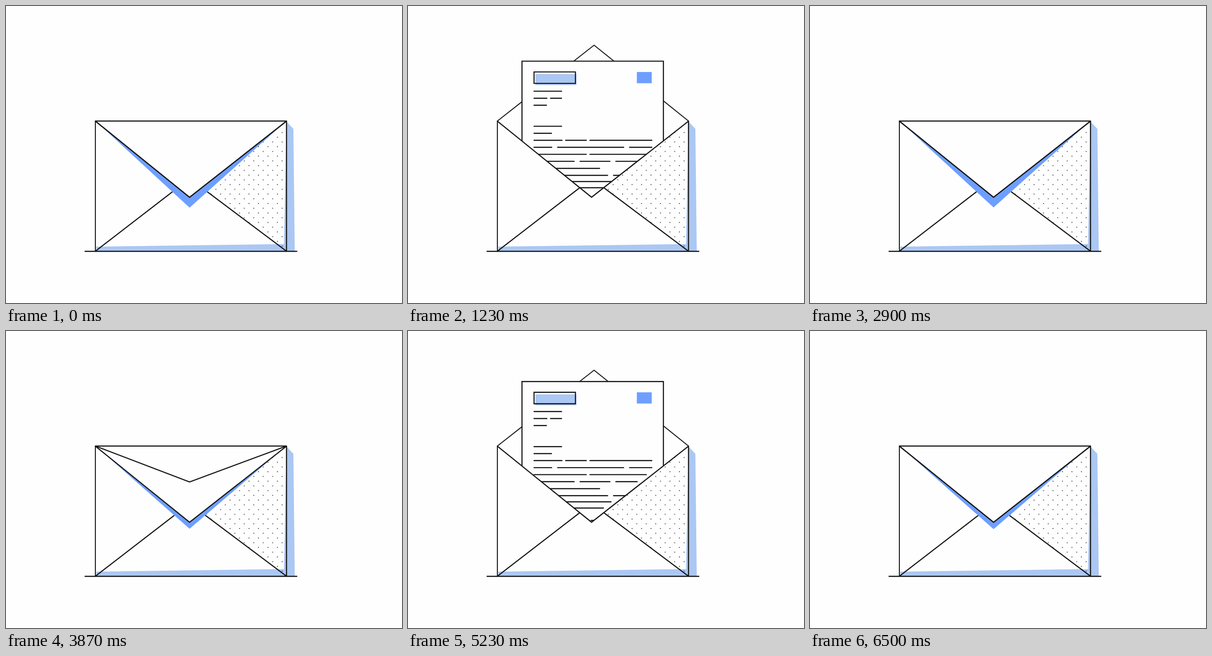
Animation of 864 by 648 pixels, one loop 6.53 s. Source, as an HTML page:

```html
<!DOCTYPE html>
<html lang="en">
<head>
<meta charset="utf-8">
<title>Envelope</title>
<style>
  html, body { margin: 0; width: 100%; height: 100%; overflow: hidden; background: #fefefe; }
  svg { display: block; width: 864px; height: 648px; }
  .line { fill: none; stroke: #151515; stroke-width: 2.4; stroke-linecap: round; stroke-linejoin: round; }
  .sheet { fill: #fefefe; stroke: #151515; stroke-width: 2.4; }
  .thin { stroke-width: 2.1; }
  .square { stroke-linejoin: miter; }
  .pale { fill: #abc7f3; }
  .blue { fill: #6e9fff; }
  .white { fill: #fefefe; }
</style>
</head>
<body>
<svg viewBox="0 0 864 648">
  <defs>
    <pattern id="dots" x="592.17" y="265.67" width="20.66" height="20.66" patternUnits="userSpaceOnUse">
      <circle cx="10.33" cy="10.33" r="1.1" fill="#222"/>
      <path d="M0 0h.01M20.66 0h.01M0 20.66h.01M20.66 20.66h.01" stroke="#222" stroke-width="2.2" stroke-linecap="round"/>
    </pattern>
    <clipPath id="pocket"><path d="M0 0H864V530H0Z"/></clipPath>
  </defs>

  <path id="backFlap" class="line thin"/>

  <g clip-path="url(#pocket)">
    <g id="letter">
      <path class="sheet" d="M248.7 .5H557.2V330H248.7Z"/>
      <path class="pale" d="M278 28.5H367.5V52.5H278Z"/>
      <path class="line square" d="M275 24H365.3V49H275Z"/>
      <path class="blue" d="M499.3 24H531.8V48.5H499.3Z"/>
      <path id="text" class="line"/>
    </g>
  </g>

  <path class="white" d="M195 251.3L400.5 417.3L612 251.3V535H195Z"/>
  <path class="pale" d="M612 252L627 268L630 535H197V525L606.5 519.5Z"/>
  <path fill="url(#dots)" d="M612 251.5L428 396L612 537Z"/>
  <path class="line" d="M195 535L374 397M612 535L428 397"/>
  <path id="shade" class="blue"/>
  <path class="line" d="M195 251.3L400.5 417.3L612 251.3"/>
  <path id="frontFlap" class="line" style="fill:#fefefe"/>
  <path class="line thin" d="M195 251.3V535"/>
  <path class="line" d="M612 251.3V535M172.5 535.3H634.5"/>
</svg>
<script>
const LOOP = 6530, STEP = 100 / 3, CYCLE = 115 * STEP;
const SHUT = 417.3, OPEN = 85.5, HINGE = 251;
const $ = id => document.getElementById(id);

// Progress from 0 to 1 between two times, then shaped.
const ramp = (t, from, to) => Math.min(1, Math.max(0, (t - from) / (to - from)));
const easeIn = (x, n) => x ** n;
const easeOut = (x, n) => 1 - (1 - x) ** n;
const sway = x => (1 - Math.cos(Math.PI * x)) / 2;

const letterTop = t => 440
  - 348 * easeOut(ramp(t, 60, 595), 3)
  + 31 * sway(ramp(t, 595, 1100))
  - 28 * sway(ramp(t, 1100, 1720))
  + 345 * easeIn(ramp(t, 1838, 2380), 4);

const flapTip = t => SHUT + (OPEN - SHUT)
  * (easeOut(ramp(t, 0, 342), 3) - sway(ramp(t, 2290, 2550)));

const shadeTip = t => 440
  - 23 * (ramp(t, 0, 90) - easeOut(ramp(t, 2510, 3160), 4));

// Per text row: the middles of its gaps, then its end.
const rows = [
  [335], [307, 335], [302], [], [], [335], [313],
  [340, 393, 532], [320, 477, 532], [393, 520], [369, 447, 500],
  [418], [442, 500], [443], [433, 500], [], [393, 520]
];

function rowPath(stops, i) {
  const y = 66 + 15.3 * Math.min(i, 12) + 13.5 * Math.max(0, i - 12);
  const half = i % 2 ? 4 : 6.5;
  let x = 275, d = '';
  stops.forEach((stop, n) => {
    const last = n === stops.length - 1;
    d += `M${x} ${y}H${last ? stop : stop - half}`;
    x = stop + half;
  });
  return d;
}
$('text').setAttribute('d', rows.map(rowPath).join(''));

function draw(time) {
  // The picture moves in even steps, thirty a second.
  const t = Math.floor((time % LOOP + 5) / STEP) * STEP % CYCLE;
  const tip = flapTip(t);
  const open = tip < HINGE;
  $('backFlap').setAttribute('d', open ? `M195 ${HINGE}L406 ${tip}L612 ${HINGE}` : '');
  $('frontFlap').setAttribute('d', open ? '' : `M195 ${HINGE}L400.5 ${tip}L612 ${HINGE}Z`);
  $('letter').setAttribute('transform', `translate(0 ${letterTop(t)})`);
  $('shade').setAttribute('d', `M195 250.5L400.5 ${shadeTip(t)}L612 250.5L400.5 ${SHUT}Z`);
}

const began = performance.now();
function tick() {
  draw(performance.now() - began);
  requestAnimationFrame(tick);
}
tick();
</script>
</body>
</html>
```
